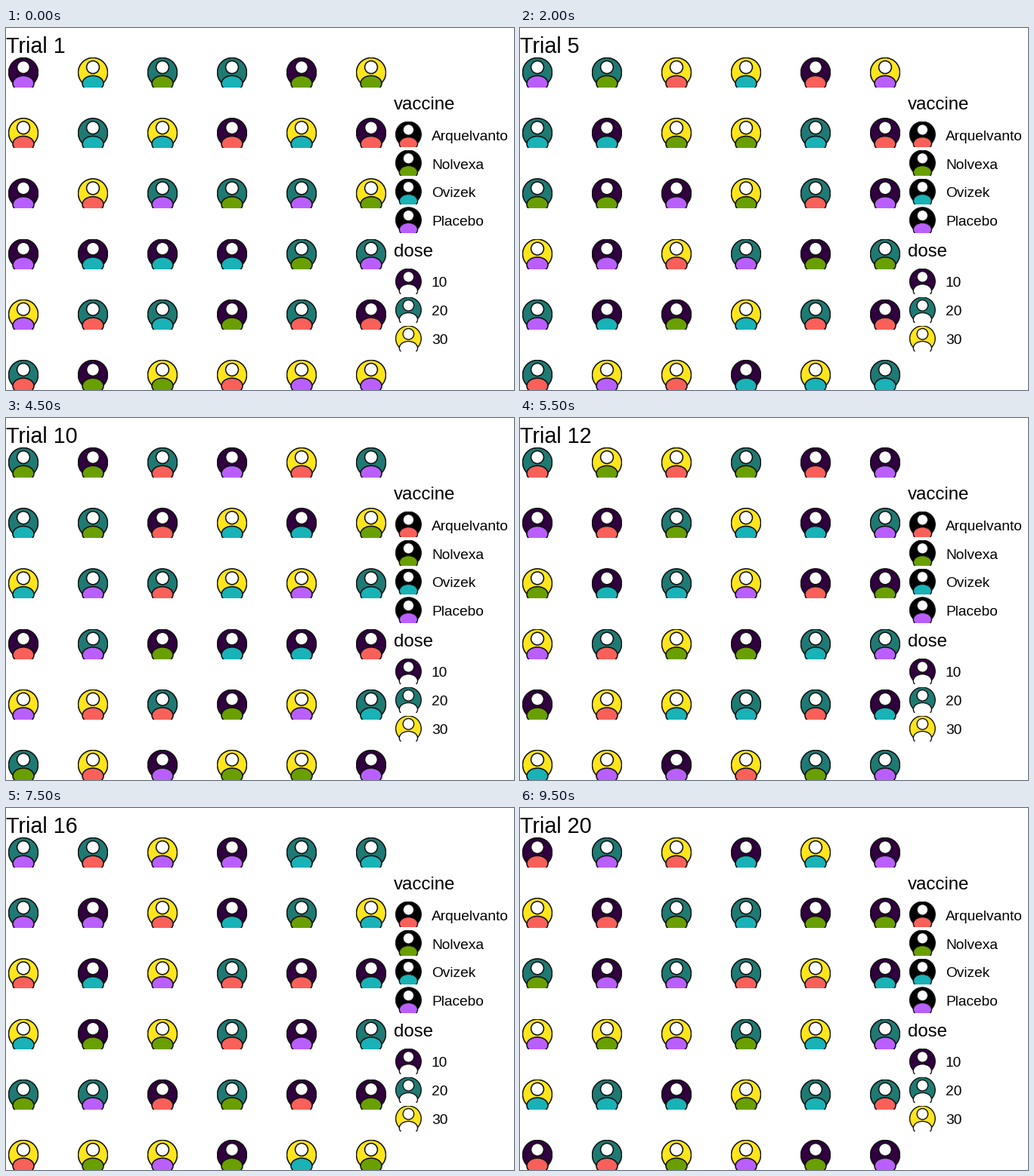
A matplotlib script for the animation above (10 s loop, 672 by 480 pixels).

```python
import random

import matplotlib.pyplot as plt
from matplotlib.animation import FuncAnimation
from matplotlib.patches import Circle, Ellipse, Rectangle

W, H, DPI = 672, 480, 100
PT = 72 / DPI  # points per pixel
TRIALS = 20

DOSES = {"10": "#30003f", "20": "#1e7a73", "30": "#ffe51b"}
VACCINES = {
    "Arquelvanto": "#f9605a",
    "Nolvexa": "#6a9f00",
    "Ovizek": "#18b2b7",
    "Placebo": "#b95fff",
}
BY_INITIAL = {name[0]: color for name, color in VACCINES.items()}

# Opening assignment: dose followed by the vaccine's initial
FIRST = """
10P 30O 20N 20O 10N 30N
30A 20O 30O 10A 30O 10A
10P 30A 20P 20N 20P 30N
10P 10O 10O 10O 20N 20P
30P 20A 20O 10N 20A 10A
20A 10N 30N 30A 30P 30P
""".split()

plt.rcParams["font.family"] = "Liberation Sans"
fig = plt.figure(figsize=(W / DPI, H / DPI), dpi=DPI, facecolor="white")
ax = fig.add_axes([0, 0, 1, 1])
ax.set_xlim(0, W)
ax.set_ylim(H, 0)
ax.axis("off")


def draw_person(x, y, size, disc_color, body_color):
    """Draw a head and shoulders on a disc, cropped to a square."""
    s = size / 40
    box = Rectangle((x - size / 2, y - size / 2), size, size,
                    transform=ax.transData)
    style = dict(edgecolor="#111111", linewidth=1.6 * s * PT)
    disc = Circle((x, y), 19.5 * s, facecolor=disc_color, **style)
    body = Ellipse((x, y + 14.5 * s), 28 * s, 20.5 * s,
                   facecolor=body_color, **style)
    head = Circle((x, y - 7 * s), 8.4 * s, facecolor="white", **style)
    for part in (disc, body, head):
        ax.add_patch(part)
        part.set_clip_path(box)
    return disc, body


def write(x, baseline, text, pixels):
    return ax.text(x, baseline, text, fontsize=pixels * PT, color="black",
                   ha="left", va="baseline")


def draw_legend():
    write(513, 108, "vaccine", 24)
    for i, (name, color) in enumerate(VACCINES.items()):
        draw_person(532.4, 141 + 37.9 * i, 34.5, "black", color)
        write(563, 149 + 37.7 * i, name, 19.2)
    write(513, 303, "dose", 24)
    for i, (dose, color) in enumerate(DOSES.items()):
        draw_person(532.4, 336 + 37.9 * i, 34.5, color, "white")
        write(563, 343 + 37.9 * i, dose, 19.2)


def assignment(trial):
    """Every dose and vaccine pair occurs three times, in random order."""
    if trial == 1:
        return FIRST
    return random.Random(trial).sample(FIRST, len(FIRST))


def update(frame):
    trial = frame + 1
    title.set_text(f"Trial {trial}")
    for (disc, body), treatment in zip(people, assignment(trial)):
        disc.set_facecolor(DOSES[treatment[:2]])
        body.set_facecolor(BY_INITIAL[treatment[2]])
    return [title]


title = write(0, 33, "Trial 1", 28.8)
people = [draw_person(23 + 92 * col, 59 + 80.2 * row, 40, "white", "white")
          for row in range(6) for col in range(6)]
draw_legend()

anim = FuncAnimation(fig, update, frames=TRIALS, interval=500,
                     repeat=True, repeat_delay=0, blit=False)
plt.show()
```
